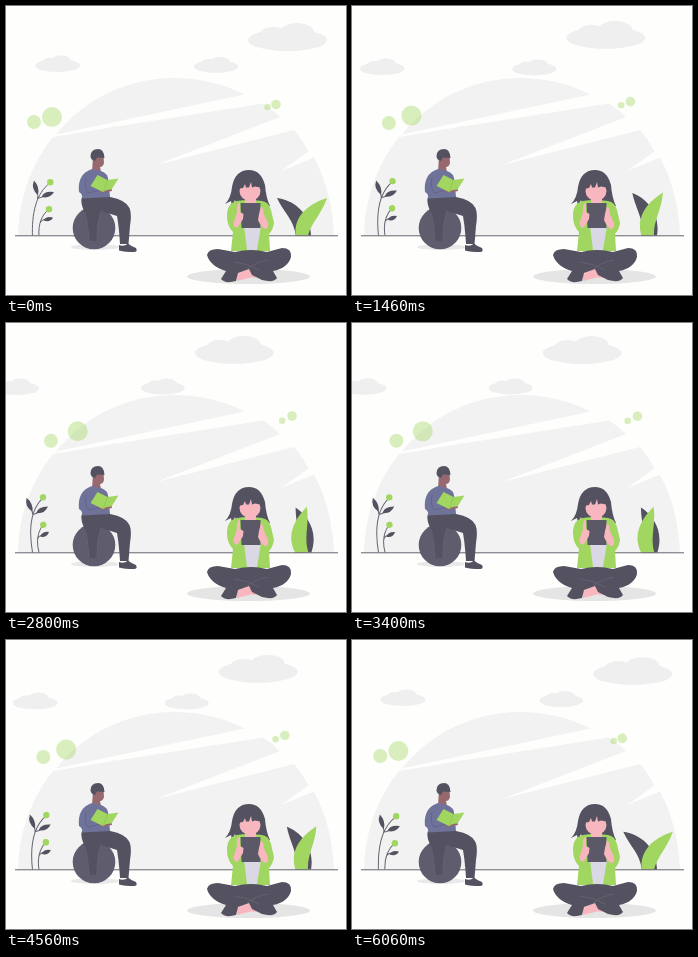
Animation of 340x289 px, one loop 6.1 s. Source, as an HTML page:

```html
<!DOCTYPE html>
<html lang="en">
<head>
<meta charset="utf-8">
<title>Reading outdoors</title>
<style>
html, body { margin: 0; width: 100%; height: 100%; overflow: hidden; background: #fefefc; }
svg { display: block; width: 100vw; height: 100vh; }
.dark { fill: #545260; }
.mid { fill: #5f5c6e; }
.green { fill: #a1d660; }
.skin { fill: #f8b7be; }
.brown { fill: #98686f; }
.gray { fill: #f2f2f2; }
.cloud { fill: #efeff0; }
.pale { fill: #a1d660; fill-opacity: .4; }
.line { fill: none; stroke: #666470; stroke-width: 1; }
.fold { fill: none; stroke: #696676; stroke-width: .7; }
</style>
</head>
<body>
<svg viewBox="0 0 340 289">
  <defs><clipPath id="above"><path d="M0 0H340V229.5H0Z"/></clipPath></defs>

  <!-- dome with its light streaks -->
  <path class="gray" d="M50 128.500L238.500 88.500C216 77 192 72 168 72C122 72 78 93 50 128.500Z"/>
  <path class="gray" d="M12 229.500C13 191 26 157 47 131L107 121L109 119.500L111 120.500L257 97.500Q266 103 274 111L150 159L288 124Q296 133 302.500 145.500L275 165L308 151.500C321 176 327 202 328 229.500Z"/>

  <g class="cloud">
    <g data-move="-58 -4.500"><ellipse cx="281.500" cy="34" rx="39.500" ry="11"/><ellipse cx="291" cy="26" rx="17" ry="9"/><ellipse cx="267" cy="28" rx="13" ry="7"/></g>
    <g data-move="-44.500 6.500"><ellipse cx="51.500" cy="59.500" rx="22.500" ry="6.500"/><ellipse cx="55" cy="54.500" rx="10" ry="5"/><ellipse cx="43" cy="56" rx="7" ry="4"/></g>
    <g data-move="-58 5"><ellipse cx="210" cy="60.500" rx="22" ry="6.500"/><ellipse cx="214" cy="56" rx="10" ry="5"/><ellipse cx="202" cy="57" rx="7" ry="4"/></g>
  </g>

  <g class="pale">
    <circle cx="46" cy="111" r="10" data-move="28 -3"/>
    <circle cx="28" cy="116" r="7" data-move="18.500 2"/>
    <circle cx="270" cy="98.500" r="4.800" data-move="17.500 -6"/>
    <circle cx="261.500" cy="101" r="3.300" data-move="16 -3.500"/>
  </g>

  <!-- plants -->
  <g clip-path="url(#above)">
    <path class="dark" data-turn="28 297 229" d="M271 192C287 194 304 206 305 229V235H290C290 215 279 209 271 192Z"/>
    <path class="green" data-turn="-30 294 229" d="M321 192C305 197 288 208 289.500 229V235H301C303 218 315 210 321 192Z"/>
    <g data-turn="-8.500 26 229">
      <path class="line" d="M26.500 231C25.500 208 30 187 44 177M32 192Q36 192 39 189M31.500 193Q33 190 30 185"/>
      <path class="dark" d="M28 174.500Q24.500 183 32 189Q34 181 28 174.500ZM35.500 191Q38 184.500 48 186Q44 193 35.500 191Z"/>
      <circle class="green" cx="44.300" cy="176.300" r="3.200"/>
    </g>
    <g data-turn="-13.500 33 229">
      <path class="line" d="M33 231C32 217 36 209 43 203M34 217Q36 213 40 213"/>
      <path class="dark" d="M37.500 214.500Q40 209.500 47 211.500Q44 217 37.500 214.500Z"/>
      <circle class="green" cx="43" cy="203.300" r="3.200"/>
    </g>
  </g>
  <path class="line" d="M9 229.800H332"/>

  <!-- man on a ball -->
  <ellipse cx="89" cy="241" rx="24" ry="3" fill="#e9e9e9"/>
  <circle class="mid" cx="88" cy="222" r="21.300"/>
  <path class="dark" d="M76 191H104Q120 194 123.500 202Q126 208 124 220L122.500 238H114Q113 221 111 210L95 205Q91 216 91 235H83Q82 217 78 205Q74 196 76 191Z"/>
  <path class="fold" d="M95 205Q91 216 91 235M83 235Q82 217 79 206"/>
  <path class="dark" d="M113 239Q118 241 122 237.500Q126 241 130 242Q132 246 128 246Q119 246 113 244.500Z"/>
  <path class="brown" d="M87 150H97.500L98 157Q97 161 94 161L95 166H86Z"/>
  <path class="dark" d="M84.500 150Q85 143 92 143Q98 143 98.500 152L91 151.500L89 155Q84.500 154 84.500 150Z"/>
  <path fill="#6f739a" d="M86 163L95 165Q102 167 102.500 175L104 191L76 192.500Q77 188 73 186Q71 168 86 163Z"/>
  <path d="M80 172Q78 182 82 187L95 184" fill="none" stroke="#5f6387" stroke-width=".8"/>
  <path class="brown" d="M91 182L105 179L106 185L95 187Z"/>
  <path class="green" d="M84.500 180L91.500 169L101.500 174L112.500 172.500L105.500 183.500Q100 183 97 186Z"/>
  <path d="M101.500 174L97 186" stroke="#8cc34d" stroke-width=".7"/>

  <!-- seated woman -->
  <ellipse cx="242.500" cy="270.500" rx="61.500" ry="7.500" fill="#e5e5e5"/>
  <path class="dark" d="M219 198Q225 192 226 181Q229 164 243 164Q255 164 259 179Q260 192 264 200H231L229 194L226 200L225 195Z"/>
  <path class="green" d="M231 195Q242 193 256 195Q263 196 265 204L268 217Q267 224 263 228L264 245H225L227 226Q221 220 221 210Q221 197 231 195Z"/>
  <path fill="#d9d8e4" d="M238 220H255L251 244H241Z"/>
  <path class="skin" d="M239 188H250V198H239Z"/>
  <ellipse class="skin" cx="244" cy="185" rx="10.500" ry="10"/>
  <path class="dark" d="M231 183Q232 169 243 170Q255 169 257 182L249 180.500L246 181.500L245 176L243 181.500H240L239 178L237 182Z"/>
  <path fill="#5b5868" d="M234.500 197H254.500V222H235.500Z"/>
  <path class="skin" d="M234 196Q230 199 231 206L227.500 217Q228 223 232 221L237 213L237.500 208L234 206ZM255 200Q258 203 257.500 207L262 217Q263 223 259 223Q255 221 252 214L253 208Z"/>
  <path class="skin" d="M231 268L243 262L247 271L231 275ZM244 266L256 262L258 270L247 272Z"/>
  <path class="dark" d="M212 243L229 246Q245 242 261 246L276 242Q286 242 285 251Q282 262 267 265L271 272Q268 277 256 274L246 269L243 263L232 267L230 275Q219 278 215 273L220 265Q204 260 201 249Q202 243 212 243Z"/>
  <path class="fold" d="M228 256Q240 257 253 264M262 254Q250 256 241 263"/>
</svg>
<script>
const LOOP = 6100;
const parts = [...document.querySelectorAll('[data-move], [data-turn]')].map(el => ({
  el, move: el.dataset.move?.split(' '), turn: el.dataset.turn?.split(' ')
}));

function draw(now) {
  // steady swing out and back
  const k = 1 - Math.abs(1 - 2 * (now % LOOP) / LOOP);
  for (const { el, move, turn } of parts) {
    el.setAttribute('transform', move
      ? `translate(${move[0] * k} ${move[1] * k})`
      : `rotate(${turn[0] * k} ${turn[1]} ${turn[2]})`);
  }
}

let start;
function tick(now) {
  start ??= now;
  draw(now - start);
  requestAnimationFrame(tick);
}
draw(0);
requestAnimationFrame(tick);
</script>
</body>
</html>
```
